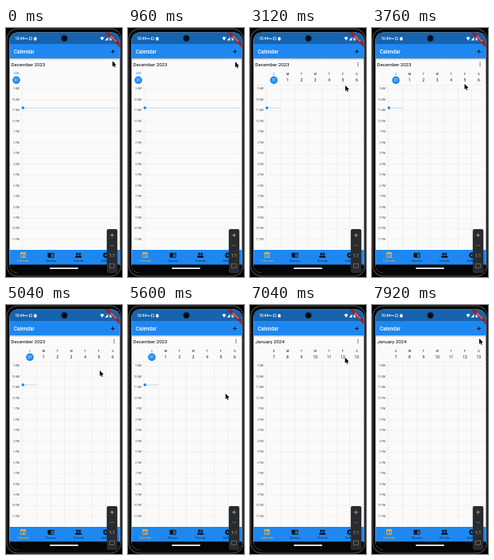
Write an HTML page with a canvas that moves like this. It is 146 px wide and 312 px high and loops after 8 s.

```html
<!DOCTYPE html>
<html lang="en">
<head>
<meta charset="utf-8">
<title>Calendar app</title>
<style>
html, body { margin: 0; width: 100%; height: 100%; overflow: hidden; background: #000; }
canvas { display: block; width: 100vw; height: 100vh; }
</style>
</head>
<body>
<canvas id="stage"></canvas>
<script>
const W = 146, H = 312, LOOP = 8000;
const canvas = document.getElementById('stage');
const c = canvas.getContext('2d');
const BLUE = '#1e88f0', PALE_BLUE = '#8fc6f8', INK = '#111', PAPER = '#fafafa', GRID = '#e2e2e2';
const HOUR = 13.46, FIRST_HOUR_Y = 76.5, GRID_X = 21.3, GRID_RIGHT = 143, DAY_W = (GRID_RIGHT - GRID_X) / 7;

// Pointer tip positions: time, x, y
const pointerPath = [
  [0, 134, 41.5], [960, 135, 42.5], [1560, 135, 42], [2080, 128, 61], [2450, 121, 72],
  [3120, 120, 72], [3760, 116.5, 70], [4500, 117, 72], [5040, 118, 82], [5400, 124, 110],
  [5560, 124, 111], [5900, 93, 110], [6560, 93, 110], [7360, 134, 42], [8000, 135, 42]
];

const clamp = v => Math.max(0, Math.min(1, v));
const ease = v => { v = clamp(v); return v * v * (3 - 2 * v); };
const progress = (t, start, end) => ease((t - start) / (end - start));

function rect(x, y, w, h, color) { c.fillStyle = color; c.fillRect(x, y, w, h); }
function round(x, y, w, h, r, color) {
  c.beginPath(); c.roundRect(x, y, w, h, r); c.fillStyle = color; c.fill();
}
function dot(x, y, r, color) {
  c.beginPath(); c.arc(x, y, r, 0, 7); c.fillStyle = color; c.fill();
}
function poly(points, color) {
  c.beginPath(); points.forEach(p => c.lineTo(...p)); c.closePath();
  c.fillStyle = color; c.fill();
}
function stroke(points, color, width) {
  c.beginPath(); points.forEach(p => c.lineTo(...p));
  c.strokeStyle = color; c.lineWidth = width; c.stroke();
}
function text(s, x, y, size, color = INK, align = 'left', weight = 400) {
  c.font = `${weight} ${size}px Roboto, sans-serif`;
  c.textAlign = align; c.textBaseline = 'middle'; c.fillStyle = color;
  c.fillText(s, x, y);
}

function pointerAt(t) {
  const i = Math.max(1, pointerPath.findIndex(p => p[0] >= t));
  const [t0, x0, y0] = pointerPath[i - 1], [t1, x1, y1] = pointerPath[i];
  const k = progress(t, t0, t1);
  return [x0 + (x1 - x0) * k, y0 + (y1 - y0) * k];
}

function drawPointer(x, y) {
  const shape = [[0, 0], [0, 7], [1.6, 5.6], [2.7, 8.1], [3.8, 7.6], [2.7, 5.1], [4.9, 4.9]];
  c.save(); c.translate(x, y);
  c.lineJoin = 'round';
  stroke([...shape, shape[0]], '#fff', 0.6);
  poly(shape, '#000');
  c.restore();
}

function drawTopBars() {
  rect(4, 5, 140, 15, '#1663ae');
  rect(4, 20, 140, 18, BLUE);
  const shadow = c.createLinearGradient(0, 38, 0, 40.5);
  shadow.addColorStop(0, 'rgba(0,0,0,.28)');
  shadow.addColorStop(1, 'rgba(0,0,0,0)');
  rect(4, 38, 140, 2.5, shadow);
  text('10:44', 11.5, 13.5, 4.6, '#fff', 'left', 500);
  stroke([[28, 13.5], [24, 13.5], [25.5, 12]], '#fff', 0.7);
  c.strokeStyle = '#fff'; c.lineWidth = 0.6; c.strokeRect(29.5, 11.8, 2.8, 3);
  round(35.2, 11.4, 3.3, 4, 0.7, '#fff');
  dot(73.5, 13, 4.2, '#10263c');
  dot(73.5, 13, 3, '#050a10');
  poly([[118.5, 12], [121, 15.7], [123.5, 12], [121, 11]], '#fff');
  poly([[124.5, 15.5], [128.5, 15.5], [128.5, 11.4]], '#fff');
  round(130.5, 11.3, 2.4, 4.3, 0.5, '#fff');
  text('Calendar', 9.8, 29.7, 6.5, '#fff', 'left', 500);
  rect(132, 29, 5, 0.9, '#111');
  rect(134.05, 27, 0.9, 5, '#111');

  c.save(); c.translate(143.5, 5.5); c.rotate(Math.PI / 4);
  rect(-14, 9.5, 28, 4.1, 'rgba(160,28,34,.85)');
  text('DEBUG', 0, 11.6, 3.1, '#d9b4b8', 'center', 700);
  c.restore();
}

function drawHours() {
  for (let i = 0; i < 15; i++) {
    const y = FIRST_HOUR_Y + i * HOUR, hour = i + 9;
    text(`${(hour - 1) % 12 + 1} ${hour < 12 ? 'AM' : 'PM'}`, 17, y, 3.3, '#555', 'right');
    rect(GRID_X - 1, y, GRID_RIGHT - GRID_X + 1, 0.35, GRID);
  }
  rect(GRID_X - 1.5, 71, 0.4, 207, GRID);
}

function drawNow(right) {
  rect(21, 99.8, right - 21, 0.6, PALE_BLUE);
  dot(21.3, 100.1, 1.8, BLUE);
}

function drawDayView() {
  text('SUN', 13, 57.3, 3.4, BLUE, 'center');
  dot(13, 65.3, 4.8, BLUE);
  text('31', 13, 65.5, 4.8, '#fff', 'center');
  drawHours();
  drawNow(142.5);
}

function drawWeek(offset, dates, current) {
  dates.forEach((date, i) => {
    const x = GRID_X + offset + DAY_W * (i + 0.5);
    const active = current && i === 0;
    text('SMTWTFS'[i], x, 57.7, 3.9, active ? BLUE : INK, 'center');
    if (active) dot(x, 65.4, 4.8, BLUE);
    text(date, x, 65.6, 4.8, active ? '#fff' : INK, 'center');
    rect(GRID_X + offset + DAY_W * (i + 1), 71, 0.4, 207, GRID);
  });
}

function drawWeekView(t) {
  drawHours();
  rect(4, 71, 140, 0.4, GRID);
  const width = GRID_RIGHT - GRID_X;
  const shift = -width * progress(t, 5600, 6050);
  c.save();
  c.beginPath(); c.rect(GRID_X - 2.5, 50, width + 4, 228); c.clip();
  if (shift > -width) {
    drawWeek(shift, [31, 1, 2, 3, 4, 5, 6], true);
    c.save(); c.translate(shift, 0); drawNow(GRID_X + DAY_W); c.restore();
  }
  if (shift < 0) drawWeek(shift + width, [7, 8, 9, 10, 11, 12, 13], false);
  c.restore();
}

function drawMenu(t) {
  const open = progress(t, 1280, 1580), fade = 1 - progress(t, 2640, 2880);
  if (!open || !fade) return;
  c.save();
  c.globalAlpha = open * fade;
  c.shadowColor = 'rgba(0,0,0,.45)'; c.shadowBlur = 2.5 * canvas.width / W;
  c.shadowOffsetY = canvas.height / H;
  round(95, 51, 47.5, 68.5 * open, 1, '#fff');
  c.shadowColor = 'transparent';
  c.beginPath(); c.rect(95, 51, 47.5, 68.5 * open); c.clip();
  if (t > 2480) rect(95, 65.5, 47.5, 13.4, '#e4e4e4');
  ['Day', 'Week', 'Work Week', 'Month', 'Timeline Day'].forEach((label, i) =>
    text(label, 98.5, 59 + i * 13.4, 4.2, i ? INK : BLUE));
  rect(140.6, 51, 1.6, 39, '#bdbdbd');
  c.restore();
}

function drawNavigation() {
  rect(4, 278, 140, 19, BLUE);
  rect(4, 296.5, 140, 12, '#050505');
  round(55, 300.3, 36, 1.7, 0.9, '#f4f4f4');
  ['Calendar', 'Classes', 'Friends', 'Settings'].forEach((label, i) =>
    text(label, 21.5 + i * 35, 291.8, 3.8, i ? '#10263c' : '#ffb52b', 'center'));

  round(18.2, 281.2, 6.6, 6.8, 0.8, '#ffb52b');
  rect(19, 283.4, 5, 3.8, BLUE);
  rect(21.2, 284.8, 1.9, 1.8, '#ffb52b');
  rect(19.4, 280.5, 0.8, 1, '#ffb52b'); rect(22.8, 280.5, 0.8, 1, '#ffb52b');

  round(52.5, 281.7, 8, 6, 0.6, '#111');
  rect(56.8, 282.6, 2.8, 4.3, BLUE);
  rect(57.3, 283.4, 1.8, 0.5, '#111'); rect(57.3, 284.8, 1.8, 0.5, '#111');

  for (const x of [89.5, 92.8]) {
    dot(x, 283, 1.5, '#111');
    round(x - 2.5, 285.2, 5, 2.5, [1.5, 1.5, 0, 0], '#111');
  }

  c.save(); c.translate(125.5, 284.7);
  for (let i = 0; i < 4; i++) { rect(-0.8, -3.6, 1.6, 7.2, '#111'); c.rotate(Math.PI / 4); }
  dot(0, 0, 2.7, '#111'); dot(0, 0, 1.2, BLUE);
  c.restore();
}

function drawToolbar() {
  round(126.8, 252, 13.4, 55, 2, '#292b2f');
  const gray = '#b8babd';
  rect(131, 259.4, 5, 0.7, gray); rect(133.15, 257.2, 0.7, 5, gray);
  rect(131, 272, 5, 0.7, '#777');
  text('1:1', 133.5, 285.2, 5.5, gray, 'center');
  c.strokeStyle = '#777'; c.lineWidth = 0.7; c.strokeRect(130.4, 295.5, 6, 5);
}

function draw(t) {
  c.setTransform(canvas.width / W, 0, 0, canvas.height / H, 0, 0);
  rect(0, 0, W, H, '#000');
  round(0.5, 0.5, 145, 311, 14, '#555');
  round(1.4, 1.4, 143.2, 309.2, 13, '#080808');

  c.save();
  c.beginPath(); c.roundRect(4.4, 5.5, 139.1, 301.5, 10); c.clip();
  rect(4, 5, 140, 302, PAPER);
  drawTopBars();
  text(t < 5900 ? 'December 2023' : 'January 2024', 6.5, 45.8, 6.1, '#000');
  for (const y of [43.4, 45.4, 47.4]) dot(136, y, 0.6, '#333');
  if (t < 2860) drawDayView(); else drawWeekView(t);
  drawMenu(t);
  drawNavigation();
  c.restore();

  drawToolbar();
  drawPointer(...pointerAt(t));
}

function resize() {
  const scale = window.devicePixelRatio || 1;
  canvas.width = Math.round(innerWidth * scale);
  canvas.height = Math.round(innerHeight * scale);
}

const start = performance.now();
function tick() {
  draw((performance.now() - start) % LOOP);
  requestAnimationFrame(tick);
}
addEventListener('resize', resize);
resize();
tick();
</script>
</body>
</html>
```
